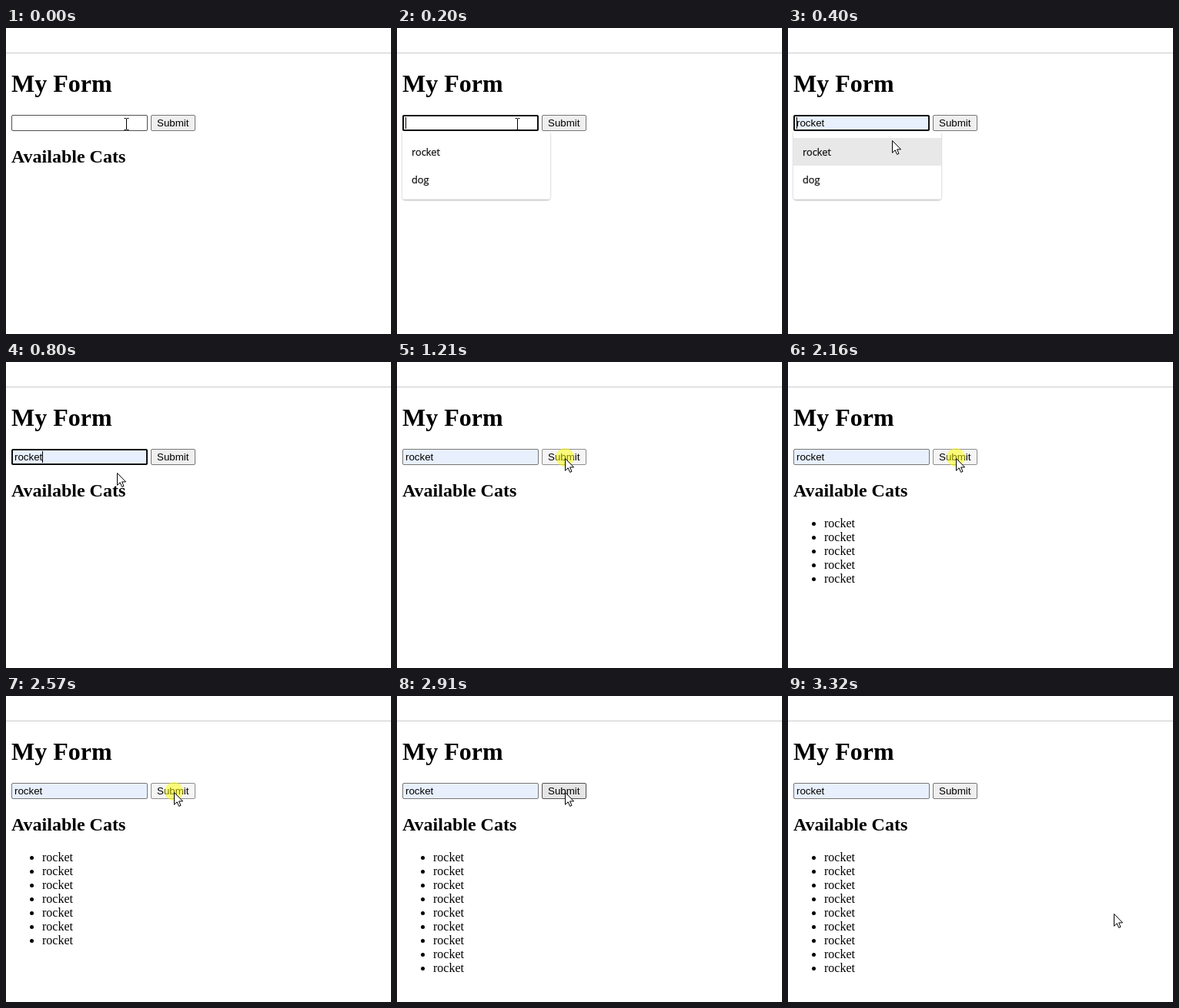
These frames come from a looping animation (500 by 398 pixels, 3.39 s). An HTML page:

```html
<!DOCTYPE html>
<html lang="en">
<head>
<meta charset="utf-8">
<title>My Form</title>
<style>
  html, body { margin: 0; width: 100%; height: 100%; overflow: hidden; background: #fff; }
  svg { display: block; width: 500px; height: 398px; }
  .serif { font-family: "Liberation Serif", "Times New Roman", serif; }
  .sans { font: 13.333px "Liberation Sans", Arial, sans-serif; }
  .menu { font: 12.8px "Open Sans", "Noto Sans", sans-serif; fill: #111; stroke: #111; stroke-width: .25; }
  .bold { font-weight: bold; }
</style>
</head>
<body>
<svg viewBox="0 0 500 398">
  <defs>
    <filter id="shadow" x="-10%" y="-10%" width="120%" height="125%">
      <feDropShadow dx="0" dy="1" stdDeviation="1.3" flood-opacity=".32"/>
    </filter>
  </defs>
  <rect width="500" height="398" fill="#fff"/>
  <rect y="32" width="500" height="1" fill="#ccc"/>
  <text class="serif bold" x="7" y="83" font-size="32">My Form</text>
  <text class="serif bold" x="7" y="175" font-size="24">Available Cats</text>

  <rect id="field" x="7.5" y="113.5" width="176" height="20" rx="1.5"/>
  <rect id="ring" x="8" y="114" width="175" height="19" rx="1.5" fill="none" stroke="#101010" stroke-width="2"/>
  <text id="value" class="sans" x="11" y="128">rocket</text>
  <rect id="caret" y="116" width="1" height="15"/>

  <rect id="button" x="188.5" y="113.5" width="57" height="20" rx="1.5"/>
  <text class="sans" x="196" y="128">Submit</text>

  <g id="list" class="serif" font-size="16"></g>

  <g id="menu">
    <path d="M7 135H199V219a4 4 0 0 1-4 4H11a4 4 0 0 1-4-4Z" fill="#fff" filter="url(#shadow)"/>
    <rect id="hover" x="7" y="143" width="192" height="36" fill="#e8e8e8"/>
    <text class="menu" x="19" y="166">rocket</text>
    <text class="menu" x="19" y="202">dog</text>
  </g>

  <circle id="press" r="12" fill="#ff0" fill-opacity=".5"/>
  <path id="arrow" d="M.5 .5V16.3L4.2 12.8L6.6 18.4L9 17.4L6.6 11.9H11.6Z" fill="#fff" stroke="#000"/>
  <path id="beam" d="M-3 -7.5H-.8L0 -6.9L.8 -7.5H3M0 -7V7M-3 7.5H-.8L0 6.9L.8 7.5H3" fill="none" stroke="#000"/>
</svg>
<script>
const LOOP = 3390, STEP = 70;
const FOCUS = 130, PICK = 660, SUBMIT = 1210;
const CLICKS = 9, PERIOD = 190, HOLD = 130;

const $ = id => document.getElementById(id);
const set = (id, attrs) => Object.entries(attrs).forEach(([k, v]) => $(id).setAttribute(k, v));
const show = (id, on) => { $(id).style.display = on ? "" : "none"; };
const clamp = (v, lo, hi) => Math.min(hi, Math.max(lo, v));
const during = (t, from, length) => t >= from && t < from + length;

// eased progress that advances once per STEP
function glide(t, from, steps) {
  const p = clamp(Math.floor((t - from) / STEP), 0, steps) / steps;
  return p * p * (3 - 2 * p);
}

// field, then menu row, then button, then away
function pointerAt(t) {
  const toRow = glide(t, 190, 3), toButton = glide(t, 730, 5), away = glide(t, 3110, 3);
  return [
    156 - 21 * toRow + 83 * toButton + 205 * away,
    125 + 21 * toRow - 21 * toButton + 158 * away
  ].map(Math.round);
}

// every release of the button adds one item
function clicksAt(t) {
  const since = t - SUBMIT;
  const submitting = during(t, SUBMIT, CLICKS * PERIOD) && since % PERIOD < HOLD;
  return {
    pressed: submitting || during(t, FOCUS, STEP) || during(t, PICK, STEP),
    count: clamp(Math.floor((since - HOLD) / PERIOD) + 1, 0, CLICKS)
  };
}

$("list").innerHTML = Array.from({ length: CLICKS }, (_, i) =>
  `<g transform="translate(0 ${18 * i})"><circle cx="33.5" cy="210.5" r="2.5"/><text x="47" y="215">rocket</text></g>`
).join("");

function render(t) {
  const [x, y] = pointerAt(t);
  const { pressed, count } = clicksAt(t);
  const focused = t >= FOCUS && t < SUBMIT;
  const picked = t >= PICK + STEP;
  const filled = t >= 400;
  const inRow = y >= 113 && y < 134;
  const overField = inRow && x >= 7 && x < 184;
  const overButton = inRow && x >= 188 && x < 246;

  set("field", { fill: filled ? "#e8f0fe" : "#fff", stroke: overField ? "#4f4f4f" : "#767676" });
  show("ring", focused);
  show("value", filled);
  show("caret", focused);
  set("caret", { x: picked ? 47 : 11 });

  const [fill, stroke] = !overButton ? ["#efefef", "#767676"]
    : pressed ? ["#f5f5f5", "#8d8d8d"] : ["#e5e5e5", "#4f4f4f"];
  set("button", { fill, stroke });

  [...$("list").children].forEach((item, i) => { item.style.display = i < count ? "" : "none"; });
  show("menu", t >= FOCUS + STEP && !picked);
  show("hover", filled);

  show("press", pressed);
  set("press", { cx: x, cy: y - 1 });
  show("beam", overField);
  show("arrow", !overField);
  set("beam", { transform: `translate(${x + .5} ${y})` });
  set("arrow", { transform: `translate(${x} ${y})` });
}

const start = performance.now();
function tick() {
  render((performance.now() - start) % LOOP);
  requestAnimationFrame(tick);
}
render(0);
requestAnimationFrame(tick);
</script>
</body>
</html>
```
